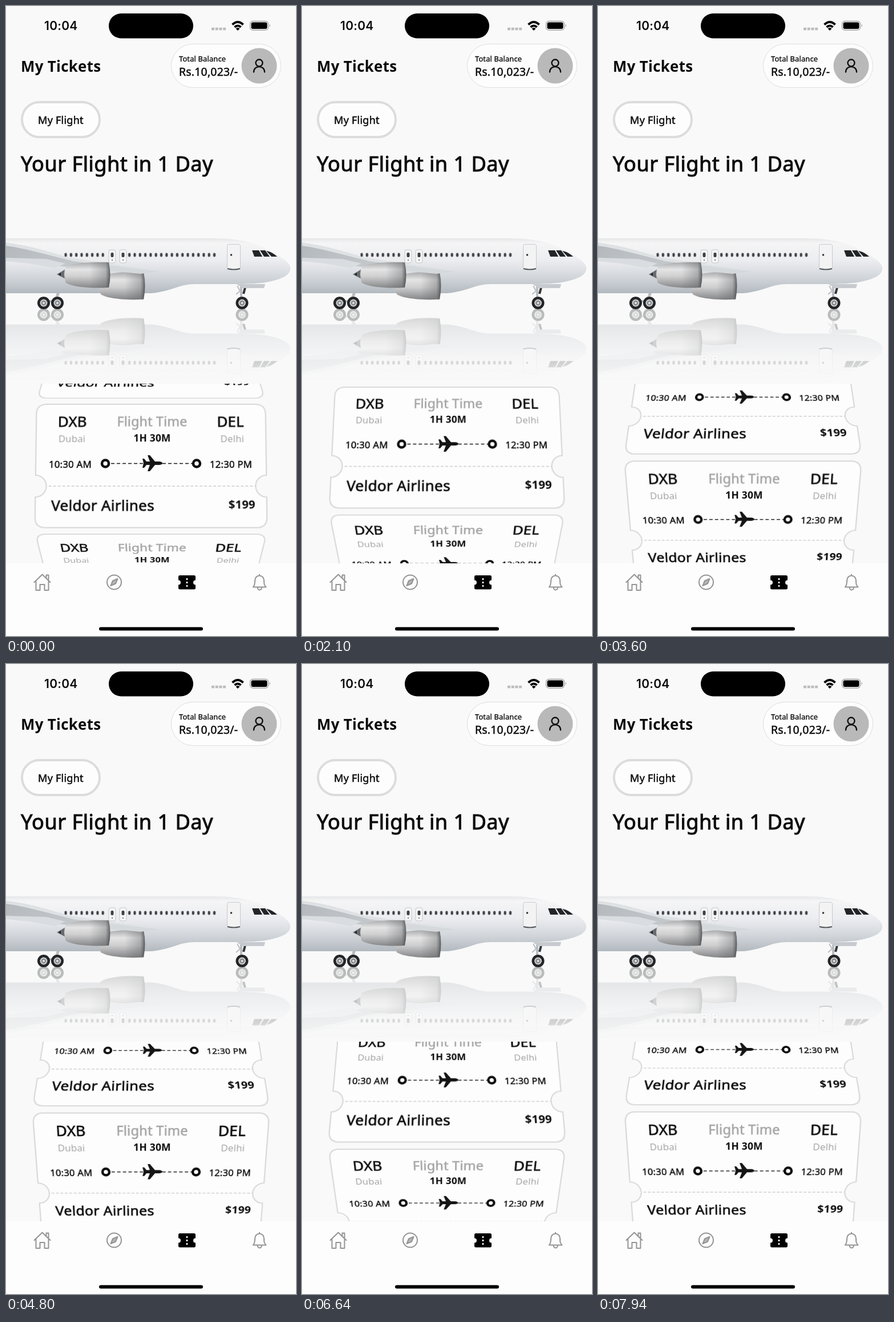
Write an HTML page that moves like this. It is 508x1101 px and loops after 8 s.

```html
<!DOCTYPE html>
<html lang="en">
<head>
<meta charset="utf-8">
<title>My Tickets</title>
<style>
html, body { margin: 0; width: 100%; height: 100%; overflow: hidden; background: #f9f9f9; }
body { position: relative; }
svg { display: block; }
/* The hairline stroke gives the regular face a medium weight. */
text {
  font-family: "Noto Sans", "Open Sans", sans-serif; font-weight: 400; letter-spacing: .012em;
  color: #0b0b0b; fill: currentColor; stroke: currentColor; stroke-width: .026em;
}
.bold { font-weight: 600; stroke: none; }
.clock { font-family: Inter, sans-serif; font-weight: 600; stroke: none; }
.mid { text-anchor: middle; }
.dim { color: #a4a4a4; }
.screen { position: absolute; left: 0; top: 0; }
.view {
  position: absolute; left: 0; top: 660px; width: 508px; height: 314px;
  overflow: hidden; perspective: 431px; perspective-origin: 254px 157px;
}
.wheel {
  position: absolute; left: 254px; top: 157px; width: 0; height: 0;
  transform-style: preserve-3d; animation: spin 8s linear infinite;
}
.card {
  position: absolute; left: -210px; top: -115px; width: 420px; height: 230px;
  transform: rotateX(calc(var(--i) * -27.28deg)) translateZ(471px);
}
.card .code { font-size: 25.85px; }
.card .city { font-size: 16.8px; stroke: none; }
.card .hour { font-size: 16.8px; }
@keyframes spin {
  0%, 6.25% { transform: translateZ(-471px) rotateX(1.7deg); animation-timing-function: cubic-bezier(.22, .6, .5, 1); }
  26.25%, 32.75% { transform: translateZ(-471px) rotateX(5.87deg); animation-timing-function: ease-in-out; }
  35.62%, 38.75% { transform: translateZ(-471px) rotateX(7.4deg); animation-timing-function: cubic-bezier(.25, .35, .5, .94); }
  45% { transform: translateZ(-471px) rotateX(16.86deg); animation-timing-function: ease-out; }
  50.75%, 55.75% { transform: translateZ(-471px) rotateX(17.6deg); animation-timing-function: ease-in; }
  60% { transform: translateZ(-471px) rotateX(18.08deg); animation-timing-function: cubic-bezier(.25, .45, .55, .96); }
  70.62% { transform: translateZ(-471px) rotateX(29.11deg); animation-timing-function: ease-out; }
  74.38%, 76.25% { transform: translateZ(-471px) rotateX(29.6deg); animation-timing-function: cubic-bezier(.3, .25, .6, .8); }
  83% { transform: translateZ(-471px) rotateX(38.05deg); animation-timing-function: cubic-bezier(.2, .55, .5, 1); }
  99.25%, 100% { transform: translateZ(-471px) rotateX(45.61deg); }
}
</style>
</head>
<body>
<svg class="screen" width="508" height="1101" viewBox="0 0 508 1101">
  <defs>
    <linearGradient id="hull" x2="0" y2="1">
      <stop stop-color="#e6e7e9"/><stop offset=".09" stop-color="#f5f5f6"/>
      <stop offset=".4" stop-color="#ecedf0"/><stop offset=".7" stop-color="#d3d7dc"/>
      <stop offset="1" stop-color="#b2b9bf"/>
    </linearGradient>
    <linearGradient id="wing" x2="1" y2=".3">
      <stop stop-color="#b3b8bc"/><stop offset="1" stop-color="#cfd3d6"/>
    </linearGradient>
    <linearGradient id="pod" x2="0" y2="1">
      <stop stop-color="#a9aaab"/><stop offset=".28" stop-color="#e4e4e5"/>
      <stop offset=".55" stop-color="#cfcfd0"/><stop offset="1" stop-color="#858688"/>
    </linearGradient>
    <linearGradient id="rim">
      <stop offset=".55" stop-color="#5a5c5e" stop-opacity="0"/><stop offset=".9" stop-color="#5a5c5e" stop-opacity=".35"/>
      <stop offset="1" stop-color="#3a3c3e" stop-opacity=".8"/>
    </linearGradient>
    <linearGradient id="fade" gradientUnits="userSpaceOnUse" y1="529" y2="654" x2="0">
      <stop stop-color="#fff" stop-opacity=".3"/><stop offset=".6" stop-color="#fff" stop-opacity=".27"/>
      <stop offset="1" stop-color="#fff" stop-opacity=".06"/>
    </linearGradient>
    <mask id="mirror" maskUnits="userSpaceOnUse" x="0" y="529" width="508" height="130">
      <rect y="529" width="508" height="130" fill="url(#fade)"/>
    </mask>
    <g id="tyre">
      <circle r="11" fill="#222426"/><circle r="6.5" fill="#c9cbcc"/>
      <circle r="4.2" fill="#85888a"/><circle r="2" fill="#e4e4e4"/>
    </g>
    <g id="exit">
      <rect x="-6" y="-9" width="12" height="23" rx="3" fill="#f5f5f6" stroke="#c3c7ca"/>
      <rect x="-2.5" y="-4" width="5" height="8" rx="2" fill="#3d4043"/>
      <circle cy="9" r="1" fill="#555"/>
    </g>
    <path id="engine" d="M3 7C16 1 46-1 78 0Q83 22 78 44C46 46 16 43 3 36Q-3 21 3 7Z"/>
    <g id="jet">
      <g fill="none" stroke="#b9bdc1" stroke-width="5">
        <path d="M98 482 88 512"/><path d="M66 516H90" stroke-width="4"/>
        <path d="M412 486V512" stroke-width="4"/><path d="M420 488 416 503" stroke="#34373a" stroke-width="4"/>
        <path d="M405 489l5 9-7 6" stroke-width="2"/>
      </g>
      <use href="#tyre" x="66" y="519"/><use href="#tyre" x="90" y="519"/><use href="#tyre" x="413.500" y="519"/>
      <path d="M0 406H360C392 406 412 409 430 414C448 419 460 428 474 435C490 443 498 451 498 459C498 471 482 478 455 483C430 487 370 486 330 486C300 487 292 498 255 502H0Z" fill="url(#hull)"/>
      <path d="M404 486h50l-2 7h-38z" fill="#c7cbcf"/>
      <g id="panes"></g>
      <use href="#exit" x="186" y="435"/><use href="#exit" x="205" y="435"/>
      <rect x="387.500" y="416.500" width="23" height="44" rx="3" fill="#f3f3f4" stroke="#c5c9cc"/>
      <path d="M388 459q11 3 22 0" fill="none" stroke="#55595c" stroke-width="2"/>
      <circle cx="394.500" cy="435" r="1.800" fill="#333"/>
      <path d="M431 427h12l6 11H435zM445 427h9l8 11H452zM456 428c7 1 14 5 19 10H465z" fill="#222528"/>
      <path d="M0 414C35 418 70 428 110 440L267 464 240 467 98 455 0 443Z" fill="url(#wing)"/>
      <path d="M0 414C35 418 70 428 110 440L267 464 118 446C70 434 35 424 0 419Z" fill="#dfe2e4"/>
      <path d="M0 440 70 442 104 450 86 458 40 450 0 446Z" fill="#d9dde0"/>
      <path d="M89 469 106 459V478Z" fill="#696d70"/>
      <path d="M92 469 96 466V472Z" fill="#222"/>
      <g transform="translate(163 465) scale(1 1.080)">
        <use href="#engine" fill="url(#pod)"/><use href="#engine" fill="url(#rim)"/>
      </g>
      <path d="M170 452 267 464 235 468 172 462Z" fill="#d5d9dc"/>
      <g transform="translate(102 448)">
        <use href="#engine" fill="url(#pod)"/><use href="#engine" fill="url(#rim)"/>
      </g>
    </g>
  </defs>

  <rect width="508" height="1101" fill="#f9f9f9"/>
  <text class="clock" x="67" y="42" font-size="21">10:04</text>
  <rect x="180" y="13" width="148" height="43.500" rx="21.750"/>
  <path d="M360 40h5m1.700 0h5m1.700 0h5m1.700 0h5" stroke="#bcbcbc" stroke-width="4.500"/>
  <g fill="none" stroke="#050505" stroke-width="4">
    <path d="M396.500 32.500Q406 23.500 415.500 32.500M400.500 37Q406 32 411.500 37"/>
  </g>
  <path d="M402.500 39.500Q406 36.500 409.500 39.500L406 43Z"/>
  <rect x="427.500" y="26.500" width="32" height="15.500" rx="5" fill="none" stroke="#a5a5a5" stroke-width="1.300"/>
  <rect x="429.500" y="28.500" width="28" height="11.500" rx="3"/>
  <path d="M461.500 31.500q3 2.700 0 5.500z" fill="#aaa"/>

  <text class="bold" x="26" y="114.500" font-size="25.850">My Tickets</text>
  <rect x="289.500" y="66.500" width="192" height="76" rx="38" fill="#fdfdfd" stroke="#dedede"/>
  <text x="303" y="96.500" font-size="12.900">Total Balance</text>
  <text x="303" y="121.500" font-size="19.400">Rs.10,023/-</text>
  <circle cx="443.500" cy="104.500" r="31" fill="#b9b9b9"/>
  <g fill="none" stroke="#0b0b0b" stroke-width="2.300" stroke-linecap="round">
    <circle cx="443.500" cy="99.500" r="6"/><path d="M434 115.500C434 103 453 103 453 115.500"/>
  </g>
  <rect x="28" y="168" width="136" height="61" rx="30.500" fill="#fdfdfd" stroke="#dcdcdc" stroke-width="4"/>
  <text x="56" y="205.500" font-size="18.100">My Flight</text>
  <text x="26" y="289" font-size="36.200">Your Flight in 1 Day</text>

  <g mask="url(#mirror)"><use href="#jet" transform="translate(0 1058.500) scale(1 -1)"/></g>
  <use href="#jet"/>

  <rect y="974" width="508" height="127" fill="#fdfdfd"/>
  <g fill="none" stroke="#949494" stroke-width="2" stroke-linejoin="round" stroke-linecap="round">
    <path d="M49.500 1007 63.500 993.500 77.500 1007M52.500 1005V1021H59.500V1011H67.500V1021H74.500V1005M70.500 999V994.500H74.500V1003"/>
    <circle cx="189.500" cy="1007" r="12.500"/>
    <path d="M195.500 1001 192 1009.500 183.500 1013 187 1004.500Z" fill="#b5b5b5"/>
    <path d="M433 1015.500C436 1012 436 1009 436 1004.500C436 992.500 452 992.500 452 1004.500C452 1009 452 1012 455.500 1015.500ZM440.500 1016C441 1022 447.500 1022 448 1016M444 995V993.500"/>
  </g>
  <path d="M304.500 995H329.500Q332 995 332 997.500V1003.500A4 4 0 0 0 332 1011.500V1017Q332 1019.500 329.500 1019.500H304.500Q302 1019.500 302 1017V1011.500A4 4 0 0 0 302 1003.500V997.500Q302 995 304.500 995Z"/>
  <path d="M317 1000v3m0 3v3m0 3v3" stroke="#fff" stroke-width="2.500"/>
  <rect x="163" y="1085.500" width="182" height="6" rx="3"/>
</svg>

<div class="view"><div class="wheel"></div></div>

<template id="ticket">
  <div class="card">
    <svg width="420" height="230" viewBox="-210 -115 420 230">
      <path d="M-184-108H184Q202-108 202-90V17A19 19 0 0 0 202 55V90Q202 108 184 108H-184Q-202 108-202 90V55A19 19 0 0 0-202 17V-90Q-202-108-184-108Z" fill="#fdfdfd" stroke="#d8d8d8" stroke-width="2.200"/>
      <path d="M-179 36H183" stroke="#d8d8d8" stroke-width="2" stroke-dasharray="5 3"/>
      <text class="code" x="-164" y="-68.500">DXB</text>
      <text class="dim mid" x="2" y="-69.500" font-size="23.200">Flight Time</text>
      <text class="code mid" x="140" y="-68.500">DEL</text>
      <text class="dim city mid" x="-139" y="-41">Dubai</text>
      <text class="bold mid" x="2" y="-42" font-size="17.400">1H 30M</text>
      <text class="dim city mid" x="143" y="-41">Delhi</text>
      <text class="hour" x="-179" y="3.500">10:30 AM</text>
      <text class="hour" x="103" y="3.500">12:30 PM</text>
      <path d="M-70-3.500H72" stroke="#111" stroke-width="1.600" stroke-dasharray="6 4"/>
      <g fill="#fff" stroke="#0b0b0b" stroke-width="4.500">
        <circle cx="-80" cy="-3.500" r="6"/><circle cx="80" cy="-3.500" r="6"/>
      </g>
      <path transform="translate(3 -4)" d="M17 0C17-2 14-3 11-3H4L-5-14H-9L-5-3H-11L-15-8H-18L-16 0-18 8H-15L-11 3H-5L-9 14H-5L4 3H11C14 3 17 2 17 0Z" fill="#151515"/>
      <text class="code" x="-174" y="79.500">Veldor Airlines</text>
      <text class="bold" x="182" y="75.500" font-size="20" text-anchor="end">$199</text>
    </svg>
  </div>
</template>

<script>
const panes = document.getElementById("panes");
for (let x = 365; x > 98; x -= 9.3) {
  if (x > 176 && x < 213) continue;
  panes.innerHTML += `<rect x="${x - 2.3}" y="431.500" width="4.600" height="7" rx="2" fill="#3f4245" stroke="#c9ccd0" stroke-width=".8"/>`;
}

const wheel = document.querySelector(".wheel");
const ticket = document.getElementById("ticket").content.firstElementChild;
for (let i = -1; i <= 4; i++) {
  const card = ticket.cloneNode(true);
  card.style.setProperty("--i", i);
  wheel.append(card);
}
</script>
</body>
</html>
```
